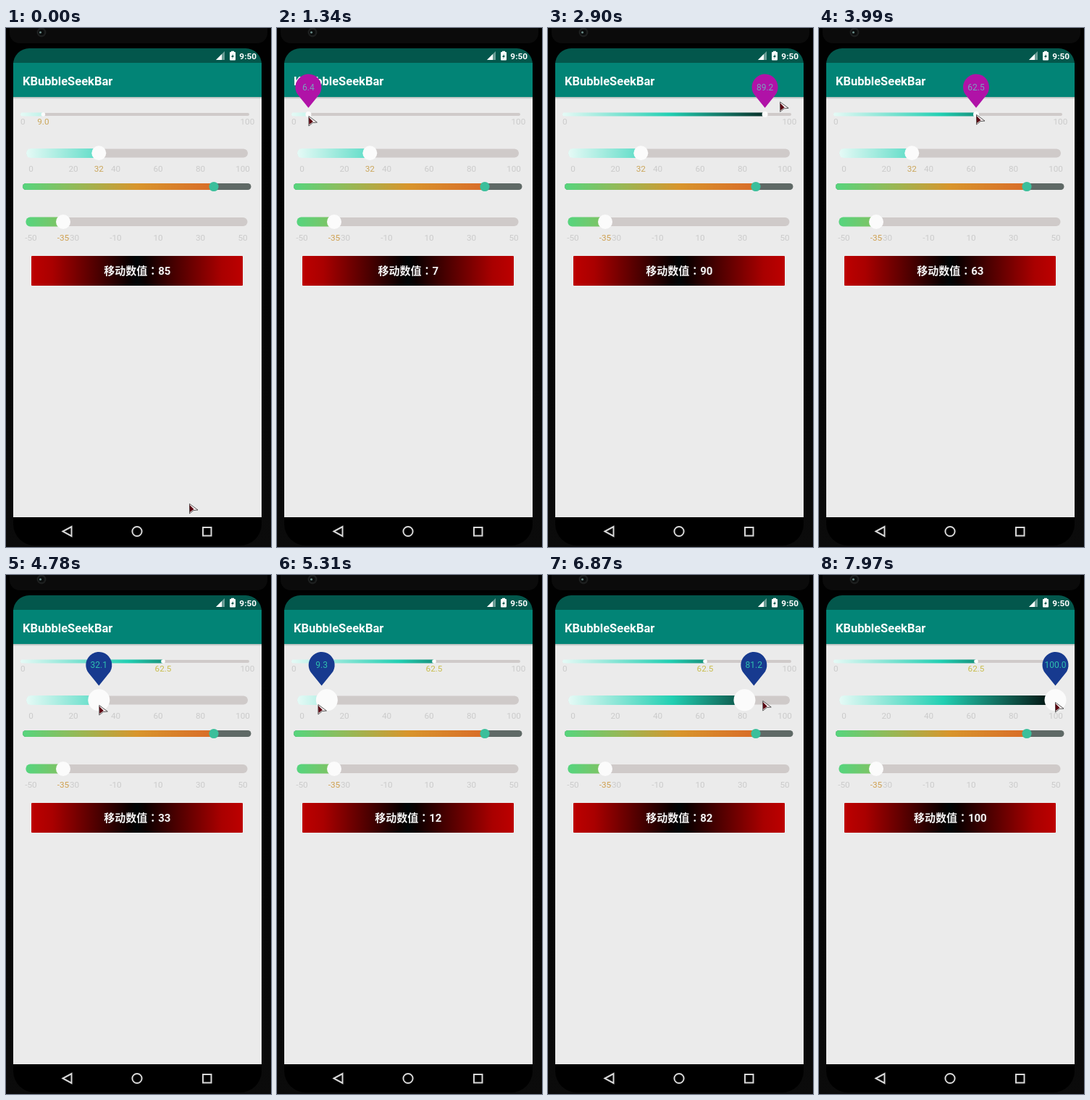
These frames come from a looping animation (366 by 715 pixels, 8000 ms). An HTML page with a canvas:

```html
<!DOCTYPE html>
<html lang="zh-Hant">
<head>
<meta charset="utf-8">
<title>KBubbleSeekBar</title>
<style>
html, body { margin: 0; width: 366px; height: 715px; overflow: hidden; background: #000; }
canvas { display: block; }
</style>
</head>
<body>
<canvas id="stage" width="366" height="715"></canvas>
<script>
const ctx = document.getElementById('stage').getContext('2d');
const LOOP = 8000;
const PRESS1 = 1040, RELEASE1 = 4460, PRESS2 = 4780;
const THUMB_LAG = 100, BUBBLE_LAG = 50;
const GREY = '#cfcac9', FAINT = '#cbcbcb', GOLD = '#cba65a', WHITE = '#fbfbfb';

// Cursor moves: start time, end time, x, y. It rests in between.
const moves = [
  [70, 490, 57, 121],
  [640, 720, 51.4, 121],
  [1040, 1200, 43.4, 121],
  [1400, 1700, 35, 121],
  [2028, 2988, 326, 101],
  [3250, 3870, 217, 119],
  [4440, 4610, 128.3, 179],
  [4793, 5393, 53, 178],
  [5773, 7273, 345, 172],
  [7570, 7660, 351, 172],
  [7890, 7970, 326, 175]
];

const clamp = (v, lo, hi) => Math.min(Math.max(v, lo), hi);
const ease = u => 0.5 - 0.5 * Math.cos(Math.PI * clamp(u, 0, 1));

function cursorAt(t) {
  let x = 253, y = 655;
  for (const [start, end, toX, toY] of moves) {
    const k = ease((t - start) / (end - start));
    x += (toX - x) * k;
    y += (toY - y) * k;
  }
  return [x, y];
}

// Thumbs and bubbles trail the cursor while their slider is held.
const dragged1 = t => cursorAt(clamp(t - THUMB_LAG, PRESS1, RELEASE1 - 60))[0];
const dragged2 = (t, lag) => Math.min(cursorAt(Math.max(t - lag, PRESS2))[0], 326.5);
const value1 = x => (x - 23.6) / 3.094;
const value2 = x => (x - 34.5) / 2.92;

function gradient(x0, x1, ...stops) {
  const g = ctx.createLinearGradient(x0, 0, x1, 0);
  stops.forEach(([p, c]) => g.addColorStop(p, c));
  return g;
}
const teal = (x0, x1) => gradient(x0, x1, [0, '#e6faf6'], [0.47, '#22cfb2'], [1, '#000']);
const warm = (x0, x1) => gradient(x0, x1,
  [0, '#55d57e'], [0.25, '#97b855'], [0.5, '#d8952c'], [0.85, '#d96a28']);

function box(x, y, w, h, fill, r = 0) {
  ctx.fillStyle = fill;
  ctx.beginPath();
  ctx.roundRect(x, y, w, h, r);
  ctx.fill();
}
function disc(x, y, r, fill) {
  ctx.fillStyle = fill;
  ctx.beginPath();
  ctx.arc(x, y, r, 0, 7);
  ctx.fill();
}
function poly(points, fill, stroke, width = 1) {
  ctx.beginPath();
  points.forEach(([x, y]) => ctx.lineTo(x, y));
  ctx.closePath();
  if (fill) { ctx.fillStyle = fill; ctx.fill(); }
  if (stroke) { ctx.strokeStyle = stroke; ctx.lineWidth = width; ctx.stroke(); }
}
function text(s, x, y, color, size = 11.7, weight = 400, align = 'center') {
  ctx.font = `${weight} ${size}px Roboto, "Noto Sans CJK TC", "Noto Sans CJK JP", sans-serif`;
  ctx.textAlign = align;
  ctx.fillStyle = color;
  ctx.fillText(s, x, y);
}
function ticks(from, y) {
  for (let i = 0; i < 6; i++) text(from + i * 20, 34.5 + i * 58.5, y, FAINT);
}
function bar(x, y, w, h, fillTo, track, fill) {
  box(x, y, w, h, track, h / 2);
  box(x, y - 0.5, fillTo - x, h + 1, fill, [h / 2, 0, 0, h / 2]);
}
function bubble(x, tip, value, fill, color) {
  const r = 18, cy = tip - 28.5, a = Math.asin(r / 28.5);
  ctx.fillStyle = fill;
  ctx.beginPath();
  ctx.arc(x, cy, r, a, Math.PI - a, true);
  ctx.lineTo(x, tip);
  ctx.fill();
  text(value.toFixed(1), x, cy + 4.2, color, 12);
}

function drawPhone() {
  const side = ctx.createLinearGradient(0, 0, 0, 715);
  side.addColorStop(0.2, '#010101');
  side.addColorStop(1, '#0b0b0b');
  box(0, 0, 366, 715, side);
  box(5, -20, 356, 41, '#0b0b0b', 14);
  disc(49, 6, 6.5, '#1d1f1f');
  disc(49, 6, 4, '#0a0c0c');
  disc(47.5, 6, 1.6, '#6a8a86');

  box(10, 28, 343, 685, '#000', [22, 22, 30, 30]);
  box(10, 28, 343, 22, '#03574c', [22, 22, 0, 0]);
  box(10, 95, 343, 579, '#ebebeb');
  const shade = ctx.createLinearGradient(0, 95, 0, 98);
  shade.addColorStop(0, '#a9b5b3');
  shade.addColorStop(1, '#ebebeb');
  box(10, 95, 343, 3, shade);
  box(10, 48, 343, 47, '#028476');

  poly([[290, 44], [302, 32], [302, 44]], '#6b9d96');
  poly([[290, 44], [298, 36], [298, 44]], '#fff');
  box(309, 33, 8, 11.5, '#fff', 1);
  box(311, 31.8, 4, 2, '#fff');
  poly([[314, 35], [311, 40], [313, 40], [312, 43], [315, 38], [313, 38]], '#03574c');
  text('9:50', 346, 42.5, '#fff', 11.8, 600, 'right');
  text('KBubbleSeekBar', 23, 78.5, '#fff', 16.5, 600, 'left');

  poly([[78.5, 693.5], [90.5, 687], [90.5, 700]], null, '#d8d8d8', 2);
  ctx.beginPath();
  ctx.arc(181, 693.5, 6.6, 0, 7);
  ctx.stroke();
  ctx.strokeRect(272, 688, 11.5, 11.5);
}

function drawSlider1(t, x) {
  const held = t >= PRESS1 && t < RELEASE1;
  bar(20, 117, 316, 4, x, GREY, teal(20, 336));
  disc(x, 119, held ? 4 : 2.8, WHITE);
  text('0', 23.4, 133.3, FAINT);
  text('100', 333.4, 133.3, FAINT);
  if (!held) text(value1(x).toFixed(1), x, 133.3, t < PRESS1 ? GOLD : '#c9bd4c');
}

function drawSlider2(t, x) {
  const held = t >= PRESS2;
  bar(28, 166.5, 306, 12, x, GREY, teal(28, 334));
  disc(x, 172.3, held ? 15 : 10, WHITE);
  ticks(0, 198.3);
  if (!held) text('32', x, 198.3, GOLD);
}

function drawFixedSliders() {
  box(23, 214, 315.5, 9, '#5f6966', 4.5);
  box(23, 214, 264, 9, warm(22, 339), [4.5, 0, 0, 4.5]);
  disc(287, 218.5, 6.6, '#3bbf9b');

  bar(27.5, 261, 306, 12, 79, GREY, warm(27, 333));
  disc(79, 267, 10, WHITE);
  ticks(-50, 292.8);
  text('-35', 79, 292.8, '#cfa050');
}

function drawButton(value) {
  box(35, 314, 292, 41, gradient(35, 327,
    [0, '#bd0000'], [0.1, '#a90000'], [0.46, '#0c0000'], [0.5, '#000506'],
    [0.54, '#0c0000'], [0.9, '#a90000'], [1, '#bd0000']), 1);
  text('移动数值：' + value, 181.3, 340.2, '#f4f4f4', 15, 600);
}

function drawCursor([x, y]) {
  ctx.save();
  ctx.translate(x, y);
  poly([[0.5, 0.5], [12, 9], [6, 9.5], [0.5, 14]], '#f6f0f0', '#333', 0.8);
  poly([[0.5, 2], [6.5, 8], [1, 12]], '#5a0812');
  ctx.restore();
}

function draw(t) {
  const x1 = dragged1(t), x2 = dragged2(t, THUMB_LAG), lead = dragged2(t, BUBBLE_LAG);
  drawPhone();
  drawSlider1(t, x1);
  drawSlider2(t, x2);
  drawFixedSliders();
  const current = t < PRESS2 ? value1(x1) : value2(x2);
  drawButton(t < PRESS1 ? 85 : Math.ceil(current - 0.05));
  if (t >= PRESS1 && t < RELEASE1) bubble(x1, 110, value1(x1), '#b012a7', '#7d9fbd');
  if (t >= PRESS2) bubble(lead, 152.5, value2(Math.min(lead, x2)), '#173a8f', '#2fbfae');
  drawCursor(cursorAt(t));
}

const start = performance.now();
function tick() {
  draw((performance.now() - start) % LOOP);
  requestAnimationFrame(tick);
}
tick();
</script>
</body>
</html>
```
